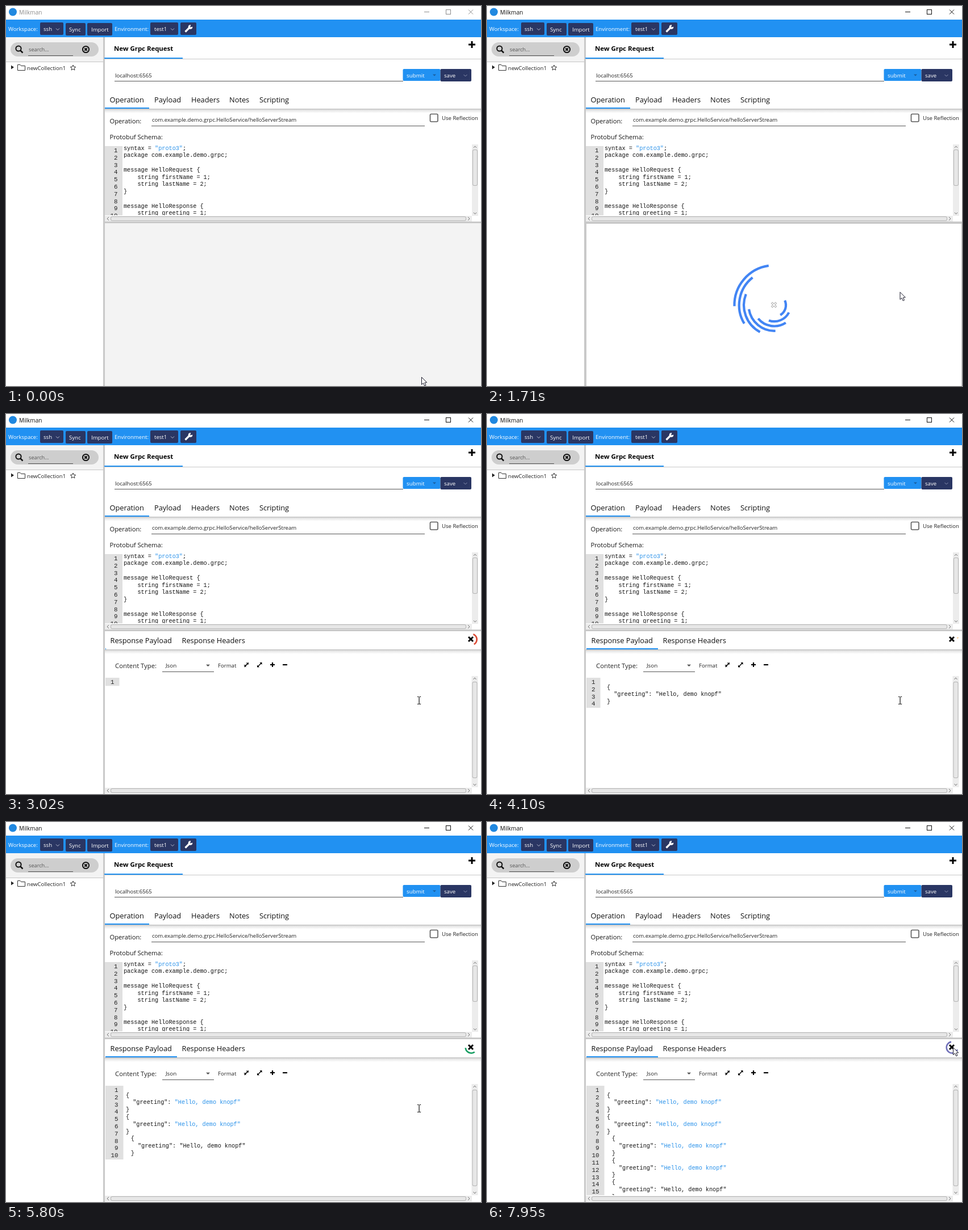
Animation of 836x670 px, one loop 8000 ms. Source, as an HTML page with a canvas:

```html
<!DOCTYPE html>
<html lang="en">
<head>
<meta charset="utf-8">
<title>Grpc request</title>
<style>
html, body { margin: 0; width: 100%; height: 100%; overflow: hidden; background: #fff; }
canvas { display: block; width: 836px; height: 670px; }
</style>
</head>
<body>
<canvas id="stage" width="836" height="670"></canvas>
<script>
const ctx = document.getElementById('stage').getContext('2d');
const LOOP = 8000;
const BLUE = '#2191f2', NAVY = '#2a3663', INK = '#151515', STRING = '#2a92ea';
const SANS = '"Open Sans", sans-serif', MONO = '"Liberation Mono", monospace';
const ACTIVE = 780, RESPONSE = 3010, FIRST_MESSAGE = 3940, MESSAGE_GAP = 880;

const clamp = v => Math.max(0, Math.min(1, v));
const ease = v => { v = clamp(v); return v * v * (3 - 2 * v); };
const mix = (a, b, k) => a + (b - a) * k;

// Linear interpolation of rows [position, value, value, ...]
function sample(rows, x) {
  let i = 0;
  while (i < rows.length - 2 && x >= rows[i + 1][0]) i++;
  const a = rows[i], b = rows[i + 1];
  const k = clamp((x - a[0]) / (b[0] - a[0]));
  return a.slice(1).map((v, n) => mix(v, b[n + 1], k));
}

function rect(x, y, w, h, color, r = 0) {
  ctx.fillStyle = color;
  ctx.beginPath();
  ctx.roundRect(x, y, w, h, r);
  ctx.fill();
}

function path(points, color, width = 1, closed = false) {
  ctx.beginPath();
  points.forEach(([x, y], i) => i ? ctx.lineTo(x, y) : ctx.moveTo(x, y));
  if (closed) ctx.closePath();
  ctx.strokeStyle = color;
  ctx.lineWidth = width;
  ctx.stroke();
}

function fillPath(points, color) {
  ctx.beginPath();
  points.forEach(([x, y]) => ctx.lineTo(x, y));
  ctx.fillStyle = color;
  ctx.fill();
}

function circle(x, y, r, color, width = 0) {
  ctx.beginPath();
  ctx.arc(x, y, r, 0, 7);
  if (width) { ctx.strokeStyle = color; ctx.lineWidth = width; ctx.stroke(); }
  else { ctx.fillStyle = color; ctx.fill(); }
}

function text(s, x, y, size = 9.6, color = INK, family = SANS, weight = 400) {
  ctx.font = `${weight} ${size}px ${family}`;
  ctx.fillStyle = color;
  ctx.fillText(s, x, y);
}

const code = (s, x, y, color = INK) => text(s, x, y, 10.2, color, MONO);
const codeWidth = s => s.length * 10.2 * 0.6;

function quotedLine(head, value, tail, x, y, color) {
  code(head, x, y);
  code(value, x + codeWidth(head), y, color);
  code(tail, x + codeWidth(head + value), y);
}

function lineNumbers(count, right, y) {
  ctx.textAlign = 'right';
  for (let i = 0; i < count; i++) text(i + 1, right, y + i * 12.8, 10.8, '#222', MONO);
  ctx.textAlign = 'left';
}

function clipped(x, y, w, h, draw) {
  ctx.save();
  ctx.beginPath();
  ctx.rect(x, y, w, h);
  ctx.clip();
  draw();
  ctx.restore();
}

const chevron = (x, y, color, s = 3) => path([[x - s, y - s / 2], [x, y + s / 2], [x + s, y - s / 2]], color);
const caret = (x, y, color, s = 3) => fillPath([[x - s, y - s / 2], [x + s, y - s / 2], [x, y + s / 2]], color);

function plus(x, y, s, w) {
  rect(x - s, y - w / 2, 2 * s, w, '#000');
  rect(x - w / 2, y - s, w, 2 * s, '#000');
}

function cross(x, y, s, color, w) {
  path([[x - s, y - s], [x + s, y + s]], color, w);
  path([[x + s, y - s], [x - s, y + s]], color, w);
}

function shadow(y) {
  const g = ctx.createLinearGradient(0, y, 0, y + 8);
  g.addColorStop(0, '#bdbdbd');
  g.addColorStop(0.35, '#e6e6e6');
  g.addColorStop(1, '#ffffff');
  ctx.fillStyle = g;
  ctx.fillRect(174, y, 662, 8);
}

function thumb(x, y, w, h) {
  rect(x, y, w, h, '#b5b5b5', 3);
  rect(x + 1, y + 1, w - 2, h - 2, '#e7e7e7', 2);
}

function vScroll(x, y, h, from, to) {
  rect(x, y, 11, h, '#ececec');
  thumb(x + 1, from, 9, to - from);
  path([[x + 3, y + 6], [x + 5.5, y + 3], [x + 8, y + 6]], '#777');
  path([[x + 3, y + h - 6], [x + 5.5, y + h - 3], [x + 8, y + h - 6]], '#777');
}

function hScroll(y) {
  rect(174, y, 646, 10, '#ececec');
  thumb(184, y + 1, 626, 8);
  path([[181, y + 2], [178, y + 5], [181, y + 8]], '#777');
  path([[813, y + 2], [816, y + 5], [813, y + 8]], '#777');
}

function titleBar(active) {
  const color = active ? '#111' : '#8c8c8c';
  circle(12, 10.5, 7, '#2088e0');
  text('Milkman', 23, 14.5, 10, color);
  rect(736, 10, 9, 1, color);
  ctx.strokeStyle = color;
  ctx.lineWidth = 1;
  ctx.strokeRect(774.5, 6.5, 8, 8);
  cross(818, 10.5, 4, color, 1);
}

function toolbar() {
  rect(0, 24, 836, 31, BLUE);
  [[60, 41, 29], [105, 35, 30], [143, 44, 30], [254, 49, 29], [307, 28, 29]]
    .forEach(([x, w, y]) => rect(x, y, w, 22, NAVY, 2));
  [['Workspace:', 4, 44], ['ssh', 66, 44], ['Sync', 111, 45], ['Import', 150, 45], ['Environment:', 191, 44], ['test1', 261, 44]]
    .forEach(([s, x, y]) => text(s, x, y, 9.6, '#fff'));
  chevron(91, 41, '#b8bdd0');
  chevron(293, 41, '#b8bdd0');
  path([[315.5, 45.5], [323, 38]], '#fff', 3.2);
  circle(324.5, 37, 3.8, '#fff');
  fillPath([[324, 37.5], [326, 31], [331, 36]], NAVY);
}

function sidebar() {
  rect(0, 55, 171, 43, '#f3f3f3');
  rect(0, 98, 171, 1, '#c4c4c4');
  rect(8, 64, 155, 25, '#cecece', 12.5);
  circle(22, 75, 4.6, '#111', 2);
  path([[25.3, 78.3], [29.5, 82.5]], '#111', 2.5);
  text('search...', 40, 80, 9.2, '#555');
  rect(39, 87, 79, 1, '#555');
  circle(140.5, 76.5, 5.6, '#111', 2);
  cross(140.5, 76.5, 2.2, '#111', 2);
  fillPath([[9, 104.5], [14, 108], [9, 111.5]], '#222');
  path([[20.5, 113.5], [20.5, 103.5], [25, 103.5], [26.5, 105.5], [33.5, 105.5], [33.5, 113.5]], '#333', 1, true);
  text('newCollection1', 37, 112.5, 9.6, '#222');
  const star = Array.from({ length: 10 }, (_, i) => {
    const a = i * Math.PI / 5 - Math.PI / 2, r = i % 2 ? 2.3 : 5;
    return [118 + r * Math.cos(a), 109 + r * Math.sin(a)];
  });
  path(star, '#333', 1, true);
  rect(171, 55, 3, 615, '#c9c9c9');
}

function requestPane() {
  text('New Grpc Request', 190, 78.5, 11.4, '#000', SANS, 700);
  rect(174, 93, 662, 1, '#c8c8c8');
  rect(173, 91, 138, 2, BLUE);
  plus(820, 68, 6, 3);

  text('localhost:6565', 192, 125.5, 9.6, '#222');
  rect(191, 132, 508, 1, '#555');
  rect(698.5, 111, 66, 21, BLUE, 2);
  text('submit', 705, 125.5, 9.8, '#fff');
  caret(754, 122, '#1b5f9e');
  rect(764.5, 111, 54.5, 22, NAVY, 2);
  text('save', 771, 125.5, 9.6, '#fff');
  chevron(808.5, 122.5, '#8a92b0');

  [['Operation', 182.5], ['Payload', 261], ['Headers', 326], ['Notes', 393], ['Scripting', 446]]
    .forEach(([s, x]) => text(s, x, 170, 12.8, '#111'));
  shadow(181);
  rect(174, 179, 78, 2, BLUE);

  text('Operation:', 182.5, 207, 11.2);
  text('com.example.demo.grpc.HelloService/helloServerStream', 257, 204, 9.6, '#222');
  rect(256, 211, 481, 1, '#555');
  ctx.strokeStyle = '#5a5a5a';
  ctx.lineWidth = 1.6;
  ctx.beginPath();
  ctx.roundRect(746.5, 190.5, 13.5, 13.5, 2);
  ctx.stroke();
  text('Use Reflection', 767, 201, 9.6, '#222');
  text('Protobuf Schema:', 182.5, 234.5, 11.2);

  const schema = [
    '', 'package com.example.demo.grpc;', '', 'message HelloRequest {',
    '    string firstName = 1;', '    string lastName = 2;', '}', '',
    'message HelloResponse {', '    string greeting = 1;'
  ];
  clipped(174, 243, 646, 126, () => {
    rect(174, 247, 31, 122, '#e0e0e0');
    lineNumbers(10, 196.5, 258);
    quotedLine('syntax = ', '"proto3"', ';', 207, 253.5, STRING);
    schema.forEach((s, i) => code(s, 207, 253.5 + i * 12.75));
  });
  vScroll(820, 244, 126, 253, 317);
  hScroll(370);
  rect(174, 380, 662, 3, '#c9c9c9');
}

// Arc start, arc length at each point of one 1.4 s sweep
const SWEEP = [[0, 45, 5], [0.4, 90, 250], [0.7, 135, 250], [1.1, 435, 5], [1.4, 495, 5]];

function spinnerArc(x, y, r, phase, offset, color, width) {
  const turn = Math.floor(phase / 1.4);
  const [start, length] = sample(SWEEP, phase - turn * 1.4);
  const a = -(start + turn * 450 + offset) * Math.PI / 180;
  ctx.beginPath();
  ctx.arc(x, y, r, a, a - length * Math.PI / 180, true);
  ctx.strokeStyle = color;
  ctx.lineWidth = width;
  ctx.stroke();
}

function loadingPane(t) {
  rect(174, 383, 662, 287, '#c9c9c9');
  rect(175, 384, 660, 286, '#fff');
  const phase = (Math.min(t, 2710) - 733) / 1000;
  [0, 30, 60.5, 91, 121.5, 152, 203].forEach((offset, i) =>
    spinnerArc(505.7, 527.5, 70.3 - i * 8.33, phase, 119 + offset, '#4285f4', 4.2));
  cross(505, 527, 4, '#999', 3.4);
  cross(505, 527, 3.6, '#fff', 1.8);
}

const SPINNER_COLORS = [[66, 133, 244], [219, 68, 55], [244, 180, 0], [15, 157, 88]];
// Time, sweep phase, rotation
const SMALL_SPIN = [[3020, 1.6, 143], [5020, 3.72, 175], [5800, 4.4, 208], [7950, 6.32, 310]];

function smallSpinner(t) {
  const [phase, offset] = sample(SMALL_SPIN, t);
  const turn = Math.floor(phase / 1.4);
  const k = clamp((phase - turn * 1.4 - 0.1) / 2);
  const next = SPINNER_COLORS[(turn + 1) % 4];
  const rgb = SPINNER_COLORS[turn % 4].map((v, i) => Math.round(mix(v, next[i], k)));
  spinnerArc(818.7, 397.5, 10, phase, offset, `rgb(${rgb})`, 2.6);
  cross(818, 397, 4, '#000', 3);
}

function formatIcons() {
  const tip = (x, y, d) => fillPath([[x, y], [x + 4 * d, y], [x, y - 4 * d]], '#000');
  path([[419.5, 446], [427, 438.5]], '#000', 1.4);
  tip(423.6, 441.6, 1);
  tip(422.4, 442.6, -1);
  path([[443, 445.5], [449.5, 439]], '#000', 1.4);
  fillPath([[450.5, 438], [446.5, 438], [450.5, 442]], '#000');
  fillPath([[442, 446.5], [446, 446.5], [442, 442.5]], '#000');
  plus(469, 442, 4, 2.2);
  rect(487, 441, 8, 2.2, '#000');
}

function responsePane(t) {
  rect(174, 383, 662, 287, '#fff');
  shadow(415);
  text('Response Payload', 183.5, 404, 12.8, '#111');
  text('Response Headers', 309.5, 404, 12.8, '#111');
  const grow = ease((t - RESPONSE - 10) / 310);
  rect(175, 413, 1 + 125 * grow, 2, BLUE);
  smallSpinner(t);

  text('Content Type:', 192, 448, 11.3, '#222');
  text('Json', 281, 447, 9.8, '#222');
  rect(275, 454, 91, 1, '#555');
  caret(355.5, 443.5, '#555', 3.5);
  text('Format', 373, 447, 9.6, '#222');
  formatIcons();

  const count = t < FIRST_MESSAGE ? 0 : 1 + Math.floor((t - FIRST_MESSAGE) / MESSAGE_GAP);
  const lines = count * 3 + 1, wide = lines > 9;
  clipped(174, 462, 646, 196, () => {
    rect(175, 465, wide ? 31.5 : 24.5, lines * 12.85 + 1.5, '#e0e0e0');
    lineNumbers(lines, wide ? 197.5 : 190.5, 476);
    for (let i = 0; i < count; i++) {
      const x = i < 2 ? 211 : 219.7, y = 484.5 + i * 38.4;
      code('{', x, y);
      quotedLine('  "greeting": ', '"Hello, demo knopf"', '', x, y + 12.8, i < count - 1 ? STRING : INK);
      code('}', x, y + 25.6);
    }
  });
  vScroll(819.5, 462, 196, 472, 642);
  hScroll(659);
}

function arrow(x, y) {
  const shape = [[0, 0], [0, 13], [3, 10.3], [5.2, 15.2], [7.5, 14.2], [5.4, 9.5], [9.3, 9.3]]
    .map(([a, b]) => [x + a + 0.5, y + b + 0.5]);
  fillPath(shape, '#fff');
  path(shape, '#1a1a2a', 1, true);
}

function beam(x, y) {
  rect(x - 0.5, y - 6, 1.2, 13, '#111');
  [-7, 6].forEach(d => {
    rect(x - 3, y + d, 2.5, 1, '#111');
    rect(x + 0.7, y + d, 2.5, 1, '#111');
  });
}

function cursor(t) {
  if (t < 1010) {
    const k = ease(t / 630);
    arrow(mix(731, 735, k) - 5 * Math.sin(k * Math.PI), mix(654, 127, k));
  } else if (t < RESPONSE) {
    const k = ease((t - 1010) / 540);
    arrow(mix(735, 726.5, k), mix(127, 504, k));
  } else {
    const k = ease((t - 7400) / 470);
    const x = mix(727, 820, k), y = mix(505, 397, k);
    (y > 460 ? beam : arrow)(x, y);
  }
}

function stepTime(t) {
  if (t < 70) return 0;
  if (t < ACTIVE) return Math.min(630, 70 * Math.floor(t / 70));
  return ACTIVE + 77.1 * Math.floor((t - ACTIVE + 3) / 77.1);
}

function draw() {
  const t = stepTime(performance.now() % LOOP);
  rect(0, 0, 836, 670, '#fff');
  titleBar(t >= ACTIVE);
  toolbar();
  sidebar();
  requestPane();
  if (t < ACTIVE) rect(174, 383, 662, 287, '#f3f3f3');
  else if (t < RESPONSE) loadingPane(t);
  else responsePane(t);
  cursor(t);
  requestAnimationFrame(draw);
}
draw();
</script>
</body>
</html>
```
